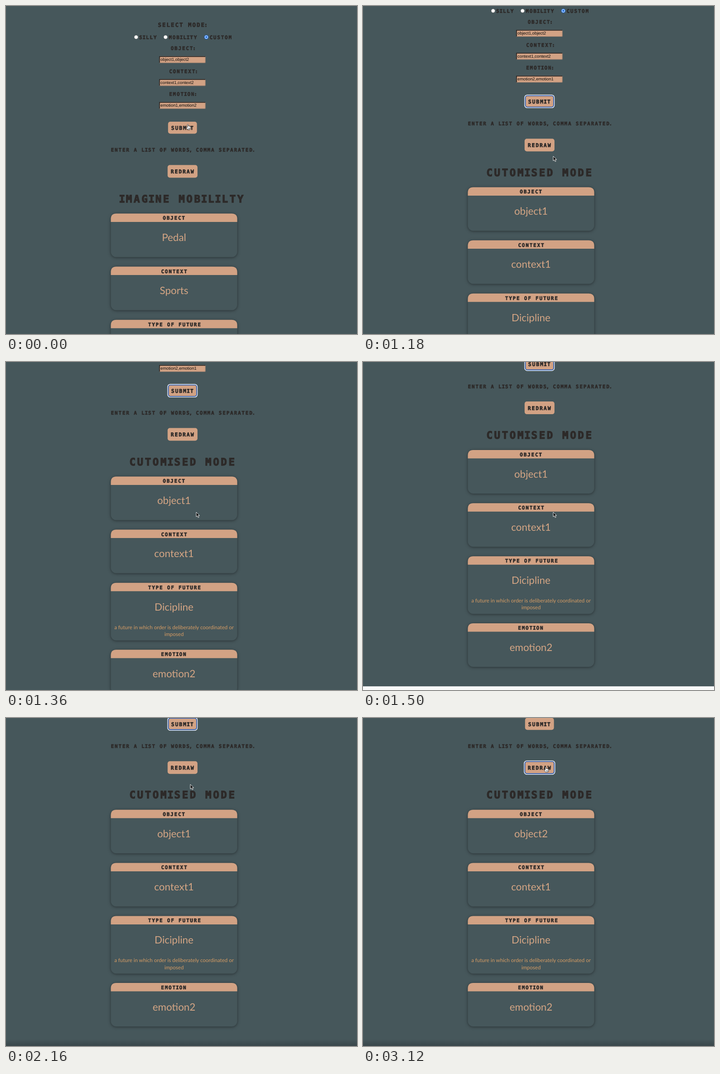
Recreate the animation shown at these times as an HTML page. Size 775x723 px, loop 3200 ms.

```html
<!DOCTYPE html>
<html lang="en">
<head>
<meta charset="utf-8">
<title>Card drawing page</title>
<style>
  html, body { margin: 0; width: 100%; height: 100%; overflow: hidden; background: #fafafa; }
  svg { display: block; width: 775px; height: 723px; }
  text { text-rendering: geometricPrecision; }
  .px { font-family: "DejaVu Sans Mono", monospace; font-weight: 700; text-anchor: middle;
        fill: #2d2a29; stroke: #2d2a29; stroke-width: .06em; white-space: pre; }
  .word, .note { font-family: Lato, "Open Sans", sans-serif; text-anchor: middle; }
  .word { font-size: 22.4px; fill: #d4a584; }
  .note { font-size: 11.5px; fill: #d69c64; }
  .field { font: 9.4px "Liberation Sans", Arial, sans-serif; fill: #0c0c0c; }
  .tan { fill: #d2a284; }
  .card { fill: #46575b; filter: drop-shadow(0 1px 3px rgba(20, 22, 24, .6)); }
</style>
</head>
<body>
<svg viewBox="0 0 775 723">
  <defs>
    <linearGradient id="shade" x1="0" y1="0" x2="0" y2="1">
      <stop offset="0" stop-color="#20282c" stop-opacity="0"/>
      <stop offset="1" stop-color="#20282c" stop-opacity=".35"/>
    </linearGradient>
  </defs>
  <g id="page"></g>
  <rect id="edge" y="708" width="775" height="15" fill="url(#shade)"/>
  <rect id="corner" x="754" y="720" width="30" height="12" rx="4" fill="#101b26"/>
  <g id="pointer">
    <path id="arrow" d="M0 0V10.2L2.4 8L4.2 12L6 11.2L4.3 7.4H7.4Z" fill="#111" stroke="#fff" stroke-width=".9"/>
    <path id="hand" d="M-1.1 1Q0 -.7 1.1 1V4.4Q2.3 3.7 3 4.8Q4.3 4.1 4.9 5.3Q6.3 5 6.4 6.5
      Q6.5 9.5 5 12H-.2Q-1.4 9.9 -3.5 7.7Q-3.6 6.2 -1.1 7.4ZM1.4 8V10.3M3 8V10.3M4.5 8V10.3"
      fill="#fff" stroke="#222" stroke-width=".8" stroke-linejoin="round"/>
  </g>
</svg>
<script>
const LOOP = 3200, STEP = 20, CENTRE = 371;
const $ = id => document.getElementById(id);

// Block lettering: each letter is centred in its cell; I and punctuation have narrow cells
const cell = c => c === 'I' ? .6 : /[:.,]/.test(c) ? .4 : .765;
const block = (text, x, y, size = 11, id = '') => {
  let left = x;
  const centres = [...text].map(c => {
    const w = cell(c) * size;
    left += w;
    return (left - w / 2 - size * .04).toFixed(2);
  });
  return `<text class="px" id="${id}" x="${centres.join(' ')}" y="${y}" font-size="${size}">${text}</text>`;
};

const radio = (x, on) => on
  ? `<circle cx="${x}" cy="68.6" r="4" fill="#fff" stroke="#176be0" stroke-width="1.3"/>
     <circle cx="${x}" cy="68.6" r="2.4" fill="#176be0"/>`
  : `<circle cx="${x}" cy="68.6" r="4.2" fill="#fff" stroke="#6d6d6d" stroke-width=".7"/>`;

const field = (value, y, id = '') => `
  <rect class="tan" x="338.7" y="${y + .7}" width="101.6" height="14.2" rx="2" stroke="#8b776b" stroke-width="1.3"/>
  <path d="M339 ${y + 14.5}V${y + .9}H440" fill="none" stroke="#1d1b1b" stroke-width="1.5"/>
  <text class="field" id="${id}" x="341" y="${y + 10.7}">${value}</text>`;

const button = (label, x, y, w, h, textX, id) => `
  <rect class="tan" x="${x}" y="${y}" width="${w}" height="${h}" rx="5"/>
  <g id="${id}" fill="none">
    <rect x="${x - .8}" y="${y - .8}" width="${w + 1.6}" height="${h + 1.6}" rx="5.5" stroke="#f4f6fa" stroke-width="1.6"/>
    <rect x="${x + .7}" y="${y + .7}" width="${w - 1.4}" height="${h - 1.4}" rx="4.5" stroke="#1c55b4" stroke-width="1.6"/>
  </g>
  ${block(label, textX, y + h / 2 + 4.5, 11.5)}`;

const card = (label, labelX, y, h, id, notes = []) => `
  <rect class="card" x="231.5" y="${y}" width="279" height="${h}" rx="12"/>
  <path class="tan" d="M231.5 ${y + 18.5}V${y + 12}q0 -12 12 -12h255q12 0 12 12v6.5z"/>
  ${block(label, labelX, y + 13.9)}
  <text class="word" id="${id}" x="${CENTRE}" y="${y + 60.8}"></text>
  ${notes.map((n, i) => `<text class="note" x="${CENTRE}" y="${y + 101.8 + 15.4 * i}">${n}</text>`).join('')}`;

$('page').innerHTML = [
  '<rect y="-20" width="775" height="998.3" fill="#46575b"/>',
  block('SELECT MODE:', 335, 46.3, 12.4),
  radio(287.3), block('SILLY', 293.5, 73),
  radio(352.3), block('MOBILITY', 359, 73),
  radio(442.3, true), block('CUSTOM', 449, 73),
  block('OBJECT:', 363.2, 97.2), field('object1,object2', 110.5),
  block('CONTEXT:', 359.7, 147.7), field('context1,context2', 161),
  block('EMOTION:', 359.7, 198.3), field('', 211.5, 'feelings'),
  button('SUBMIT', 357.8, 255, 63.8, 26.5, 364.2, 'submitRing'),
  block('ENTER A LIST OF WORDS, COMMA SEPARATED.', 231.2, 321),
  button('REDRAW', 356.8, 350.5, 66, 28, 363.2, 'redrawRing'),
  block('IMAGINE MOBILILTY', 250.5, 432.6, 22.4, 'titleA'),
  block('CUTOMISED MODE', 271.5, 432.6, 22.4, 'titleB'),
  card('OBJECT', 345.8, 457.5, 96, 'object'),
  card('CONTEXT', 342, 574.6, 96, 'context'),
  card('TYPE OF FUTURE', 313.3, 691.7, 127, 'future',
    ['a future in which order is deliberately coordinated or', 'imposed']),
  card('EMOTION', 341.8, 839.3, 96, 'emotion')
].join('');
$('future').textContent = 'Dicipline';

const SCROLL = [[1020, 0], [1100, 14], [1180, 58], [1280, 134.4], [1360, 205], [1420, 249],
  [1460, 263], [1500, 263.4], [1560, 260.5], [1640, 257.2], [1740, 255.6], [1840, 255.2]];
const POINTER_X = [[740, 401.5], [800, 404], [900, 416], [980, 420], [1820, 420], [2000, 415], [2180, 406], [2320, 403.5]];
const POINTER_Y = [[740, 260.5], [800, 272], [900, 318], [980, 331], [1500, 331], [1740, 328], [1820, 328],
  [1920, 290], [2080, 180], [2220, 121], [2320, 107.5]];
const DRAWS = [
  [0, 'Pedal', 'Sports', 'emotion1'],
  [540, 'object1', 'context1', 'emotion2'],
  [2480, 'object2', 'context2', 'emotion1'],
  [2960, 'object2', 'context1', 'emotion2']
];

const at = (steps, t) => {
  const i = steps.findIndex(s => s[0] > t);
  if (i === 0) return steps[0][1];
  if (i < 0) return steps[steps.length - 1][1];
  const [t0, a] = steps[i - 1], [t1, b] = steps[i];
  return a + (b - a) * (t - t0) / (t1 - t0);
};
const show = (id, on) => { $(id).style.display = on ? '' : 'none'; };
const write = (id, text) => { if ($(id).textContent !== text) $(id).textContent = text; };

function render(t) {
  const scroll = at(SCROLL, t), x = at(POINTER_X, t), y = at(POINTER_Y, t);
  const pageY = y + scroll;
  const over = x > 357 && x < 423 && (pageY > 255 && pageY < 281 || pageY > 350 && pageY < 379);
  const custom = t >= 540;

  $('page').setAttribute('transform', `translate(0 ${-scroll})`);
  $('pointer').setAttribute('transform', `translate(${x} ${y})`);
  show('hand', over);
  show('arrow', !over);
  show('submitRing', t >= 400 && t < 2400);
  show('redrawRing', t >= 2400);
  show('titleA', !custom);
  show('titleB', custom);
  show('edge', t >= 1900);
  show('corner', t >= 2500 && t < 2800);
  write('feelings', custom ? 'emotion2,emotion1' : 'emotion1,emotion2');

  const draw = DRAWS.filter(d => d[0] <= t).pop();
  ['object', 'context', 'emotion'].forEach((id, i) => write(id, draw[i + 1]));
}

// The picture advances in whole steps, as a screen recording does
const start = performance.now();
function tick() {
  const t = (performance.now() - start) % LOOP;
  render(Math.floor(t / STEP) * STEP);
  requestAnimationFrame(tick);
}
tick();
</script>
</body>
</html>
```
